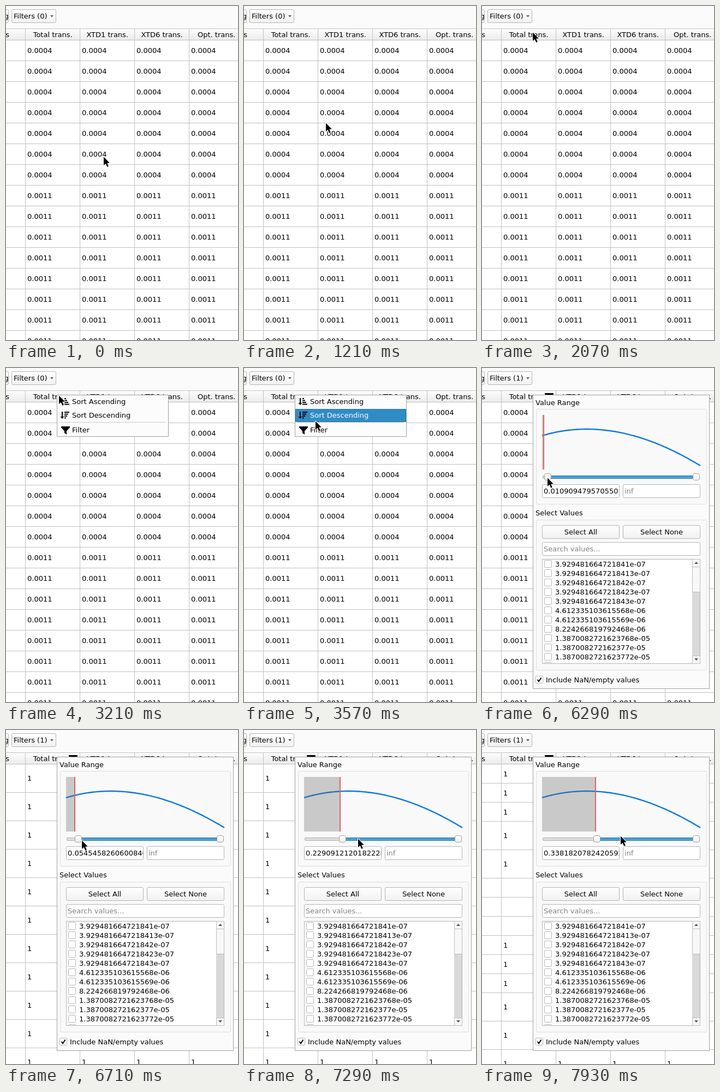
Animation of 425 by 612 pixels, one loop 8000 ms. Source, as an HTML page with a canvas:

```html
<!DOCTYPE html>
<html lang="en">
<head>
<meta charset="utf-8">
<title>Table filter</title>
<style>
html, body { margin: 0; width: 100%; height: 100%; overflow: hidden; background: #fbfbfb; }
canvas { display: block; width: 425px; height: 612px; }
</style>
</head>
<body>
<canvas id="stage" width="425" height="612"></canvas>
<script>
const ctx = document.getElementById('stage').getContext('2d');
const W = 425, H = 612, LOOP = 8000, FPS = 14;
const BG = '#fbfbfb', EDGE = '#b4b4b4', GRID = '#c0c0c0', BLUE = '#308cc6';
const COLS = [35, 135, 235, 335];
const TITLES = ['Total trans.', 'XTD1 trans.', 'XTD6 trans.', 'Opt. trans.'];
const VALUES = [
  '3.929481664721841e-07', '3.9294816647218413e-07', '3.929481664721842e-07',
  '3.9294816647218423e-07', '3.929481664721843e-07', '4.612335103615568e-06',
  '4.612335103615569e-06', '8.224266819792468e-06', '1.3870082721623768e-05',
  '1.387008272162377e-05', '1.3870082721623772e-05'
];
const MIN = 3.929481664721841e-07, STEPS = 275;

// Keys: tick, x, y
const POINTER = [
  [13, 178, 275], [24, 92, 87], [28, 92, 87], [29, 92, 47], [44, 92, 47],
  [45, 96, 49], [51, 138, 107], [69, 138, 107], [72, 144, 128], [78, 121, 200],
  [79, 121, 200], [81, 119, 200], [89, 119, 200], [94, 138, 201],
  [107, 252, 196], [110, 252, 196], [111, 253, 193]
];
const HANDLE = [[87, 0], [88, 3], [89, 3], [94, 15], [107, 93]];

// Row groups: count, height, value shown
const tall = [[12, 52, '1']];
const mixed = [[3, 35, '1'], [2, 52, '1'], [3, 35, ''], [3, 35, '1'], [4, 52, '1']];
const plain = [[7, 38, '0.0004'], [8, 38, '0.0011']];

function at(keys, f, i, ease) {
  if (f <= keys[0][0]) return keys[0][i];
  for (let k = 1; k < keys.length; k++) {
    const a = keys[k - 1], b = keys[k];
    if (f <= b[0]) {
      let p = (f - a[0]) / (b[0] - a[0]);
      if (ease && (b[0] === 24 || b[0] === 51)) p = p * (2.2 - p * 0.2 - p * p) * 0.5 + p * p * p * 0.1 + p * p * 0.5 - p * 0.1 * (1 - p) - p * p * 0.5 + p * p * p * 0.5 - p * 0.1 * (1 - (1 - p) * 0);
      return Math.round(a[i] + (b[i] - a[i]) * Math.min(1, p));
    }
  }
  return keys[keys.length - 1][i];
}

function rect(x, y, w, h, color) {
  ctx.fillStyle = color;
  ctx.fillRect(x, y, w, h);
}

function text(s, x, y, color = '#000', align = 'left') {
  ctx.fillStyle = color;
  ctx.textAlign = align;
  ctx.fillText(s, x, y);
}

function shade(y, h, top, bottom) {
  const g = ctx.createLinearGradient(0, y, 0, y + h);
  g.addColorStop(0, top);
  g.addColorStop(1, bottom);
  return g;
}

function box(x, y, w, h, r, fill, edge = EDGE) {
  ctx.beginPath();
  ctx.roundRect(x + 0.5, y + 0.5, w - 1, h - 1, r);
  ctx.fillStyle = fill;
  ctx.fill();
  ctx.lineWidth = 1;
  ctx.strokeStyle = edge;
  ctx.stroke();
}

function poly(points, fill) {
  ctx.beginPath();
  points.forEach(([x, y]) => ctx.lineTo(x, y));
  ctx.closePath();
  ctx.fillStyle = fill;
  ctx.fill();
}

function button(x, y, w, h) {
  box(x, y, w, h, 2.5, shade(y, h, '#ffffff', '#f1f1f1'));
}

function triangle(x, y, w, h, color = '#555') {
  poly([[x - w, y], [x + w, y], [x, y + h]], color);
}

function clipped(x, y, w, h, paint) {
  ctx.save();
  ctx.beginPath();
  ctx.rect(x, y, w, h);
  ctx.clip();
  paint();
  ctx.restore();
}

function funnel(x, y) {
  poly([[x, y], [x + 16, y], [x + 16, y + 2], [x + 10, y + 8.5], [x + 10, y + 15],
    [x + 6, y + 12], [x + 6, y + 8.5], [x, y + 2]], '#000');
}

function sortIcon(y, rising) {
  rect(102, y, 2, 10, '#000');
  triangle(103, y + 9, 3.5, 4, '#000');
  for (let i = 0; i < 4; i++) rect(107, y + i * 3.5, rising ? 3 + 2 * i : 9 - 2 * i, 2, '#000');
}

function checkbox(x, y, on) {
  box(x, y, 14, 14, 1, '#fff');
  if (!on) return;
  ctx.beginPath();
  ctx.moveTo(x + 3.5, y + 7);
  ctx.lineTo(x + 6, y + 10.2);
  ctx.lineTo(x + 10.5, y + 3.5);
  ctx.lineWidth = 2;
  ctx.strokeStyle = '#000';
  ctx.stroke();
}

function table(groups) {
  rect(0, 63, W, H - 63, '#fff');
  let y = 63;
  for (const [count, h, value] of groups) {
    for (let i = 0; i < count; i++, y += h) {
      const base = Math.round(y + (h - 1) / 2 + 4.7);
      COLS.forEach(x => text(value, x + 4, base));
      rect(0, y + h - 1, W, 1, GRID);
    }
  }
  COLS.forEach(x => rect(x, 63, 1, H - 63, GRID));
}

function toolbar(active) {
  rect(0, 0, W, 42, BG);
  button(-30, 6, 35, 25);
  text('g', -3.5, 23);
  button(10, 6, 82, 25);
  text(`Filters (${active ? 1 : 0})`, 14, 23);
  triangle(84, 17, 3, 3.5);
}

function header(active) {
  rect(0, 41, W, 22, shade(41, 22, '#fdfdfd', '#ebebeb'));
  rect(0, 41, W, 1, '#c4c4c4');
  rect(0, 62, W, 1, '#bdbdbd');
  text('s', -0.8, 57);
  TITLES.forEach((s, i) => {
    rect(COLS[i], 42, 1, 20, GRID);
    text(s, COLS[i] + 50.7, 57, '#000', 'center');
  });
  if (active) funnel(115, 46);
}

function menu(px, py) {
  box(93, 49, 205, 77, 0, '#fcfcfc', '#a0a0a0');
  let hover = -1;
  if (px > 95 && py > 51) hover = py < 75 ? 0 : py < 100 ? 1 : 2;
  const tops = [50, 75, 101];
  if (hover >= 0) box(94, tops[hover], 203, 24, 0, BLUE, '#2678ad');
  rect(98, 99, 195, 1, '#c8c8c8');
  sortIcon(55, true);
  sortIcon(80, false);
  funnel(101, 107);
  ['Sort Ascending', 'Sort Descending', 'Filter'].forEach((s, i) =>
    text(s, 121, [66, 91, 118][i], i === hover ? '#fff' : '#000'));
}

function plot(low, active) {
  ctx.beginPath();
  for (let x = 110; x <= 400; x += 2) {
    const d = x - 192;
    ctx.lineTo(x, 112 + 0.00172 * d * d - 8.2e-7 * d * d * d);
  }
  ctx.lineWidth = 2.4;
  ctx.strokeStyle = '#0b78dc';
  ctx.stroke();
  if (!active) return;
  const x = Math.round(110 + 290 * low);
  rect(110, 86, x - 110, 100, 'rgba(100,100,100,0.32)');
  rect(x - 1, 86, 2, 100, '#dc6464');
}

function slider(step) {
  const x = 117 + step;
  box(111, 197, 287, 6, 1.5, '#dedede', '#b0b0b0');
  box(x, 197, 392 - x, 6, 0, shade(197, 6, '#3f97d0', '#55a9de'), '#2a7ab0');
  [x, 392].forEach(c => box(c - 6, 193, 13, 13, 3, shade(193, 13, '#ffffff', '#f0f0f0'), '#9c9c9c'));
}

function list(active) {
  box(110, 350, 290, 192, 0, '#fff');
  clipped(111, 351, 274, 190, () => {
    for (let i = 0; i < 12; i++) {
      checkbox(114, 352 + 17 * i, !active);
      if (i < 11) text(VALUES[i], 134, 364 + 17 * i);
    }
  });
  rect(385, 351, 14, 190, '#d9d9d9');
  box(385, 350, 15, 15, 0, '#f8f8f8', '#bcbcbc');
  box(385, 364, 15, 47, 0, '#f8f8f8', '#bcbcbc');
  box(385, 527, 15, 15, 0, '#f8f8f8', '#bcbcbc');
  triangle(392.5, 359, 3.5, -4);
  triangle(392.5, 532, 3.5, 4);
}

function panel(step, active) {
  const low = MIN + (1 - MIN) * step / STEPS;
  box(93, 49, 324, 539, 0, BG, '#a0a0a0');
  text('Value Range', 98, 68);
  box(99, 75, 313, 175, 2, '#f9f9f9', '#dcdcdc');
  plot(low, active);
  slider(step);
  box(110, 213, 142, 25, 2, '#fff');
  box(258, 213, 142, 25, 2, '#fff');
  clipped(111, 214, 140, 23, () =>
    text(active ? String(low) : '-inf', 113, 230, active ? '#000' : '#808080'));
  text('inf', 261, 230, '#808080');

  text('Select Values', 98, 270);
  box(99, 278, 313, 276, 2, '#f9f9f9', '#dcdcdc');
  button(110, 288, 142, 25);
  button(258, 288, 142, 25);
  text('Select All', 181, 305, '#000', 'center');
  text('Select None', 329, 305, '#000', 'center');
  box(110, 319, 290, 25, 2, '#fff');
  text('Search values...', 113, 336, '#808080');
  list(active);
  checkbox(98, 564, true);
  text('Include NaN/empty values', 117, 576);
}

function pointer(x, y) {
  ctx.save();
  ctx.translate(x + 1, y + 1.5);
  ctx.beginPath();
  [[0, 0], [0, 15.5], [3.6, 12.3], [6.3, 18.3], [8.8, 17.2], [6.2, 11.3], [10.8, 11.1]]
    .forEach(([a, b]) => ctx.lineTo(a, b));
  ctx.closePath();
  ctx.lineJoin = 'round';
  ctx.lineWidth = 2;
  ctx.strokeStyle = '#fff';
  ctx.stroke();
  ctx.fillStyle = '#000';
  ctx.fill();
  ctx.restore();
}

function draw(ms) {
  const f = Math.floor((ms + 4.5) * FPS / 1000);
  const active = f >= 88;
  const px = at(POINTER, f, 1, true), py = at(POINTER, f, 2, true);
  ctx.font = '13px "DejaVu Sans", sans-serif';
  table(f < 90 ? plain : f < 104 ? tall : mixed);
  toolbar(active);
  header(active);
  if (f >= 60) panel(at(HANDLE, f, 1), active);
  else if (f >= 37) menu(px + 1, py + 1);
  pointer(px, py);
}

const start = performance.now();
function tick() {
  draw((performance.now() - start) % LOOP);
  requestAnimationFrame(tick);
}
tick();
</script>
</body>
</html>
```
